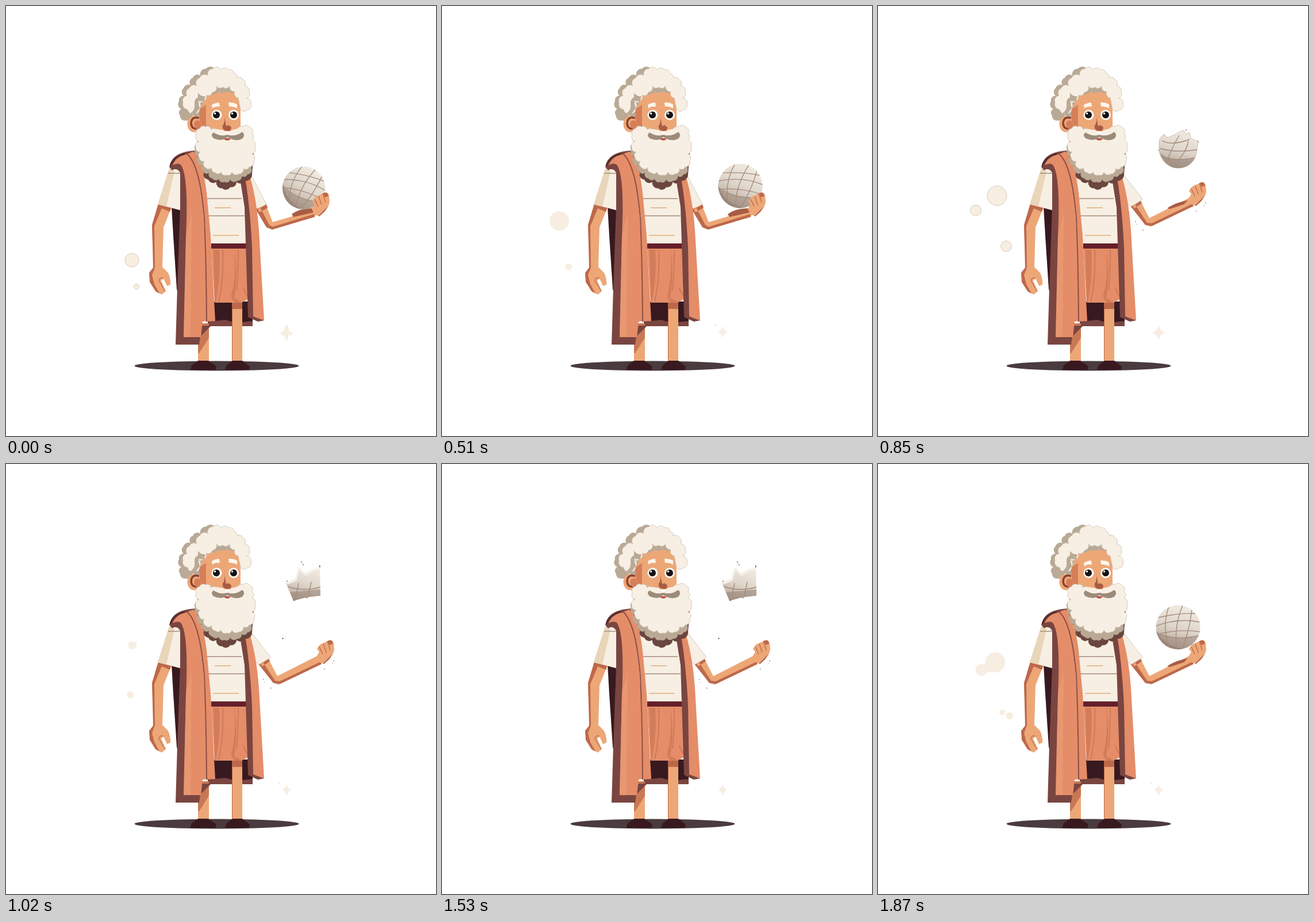
Write an HTML page that moves like this. It is 748x748 px and loops after 2040 ms.

```html
<!DOCTYPE html>
<html lang="en">
<head>
<meta charset="utf-8">
<title>Philosopher and orb</title>
<style>
html, body { margin: 0; width: 100%; height: 100%; overflow: hidden; background: #fff; }
svg { display: block; width: 100%; height: 100%; }
/* One group per 170 ms step; --k is its place in the loop. */
.step {
  visibility: hidden;
  animation: show 2040ms step-end infinite;
  animation-delay: calc(var(--k) * 170ms - 2040ms);
}
@keyframes show { 0% { visibility: visible } 8.33333%, 100% { visibility: hidden } }
.brows { animation: raise 2040ms step-end infinite; }
@keyframes raise { 0% { transform: none } 50% { transform: translateY(-3px) } 83.33333%, 100% { transform: none } }
.cream { fill: #f7efe3 }
.taupe { fill: #b9a995 }
.skin { fill: #eda777 }
.shade { fill: #bd684b }
.cloth { fill: #e48d68 }
.brown { fill: #7a4540 }
.dark { fill: #38191f }
.air { fill: #f7eee1 }
.line { fill: none; stroke: #a58b7c; stroke-width: 1.4 }
.rim { stroke: #c9bfb3; stroke-width: .8 }
</style>
</head>
<body>
<svg viewBox="0 0 748 748">
<defs>
  <linearGradient id="stone" x1=".65" y1="0" x2=".35" y2="1">
    <stop offset="0" stop-color="#f1ebe2"/>
    <stop offset=".5" stop-color="#dfd6cb"/>
    <stop offset="1" stop-color="#b3a396"/>
  </linearGradient>
  <clipPath id="round"><circle r="38.5"/></clipPath>

  <g id="ball">
    <circle r="38.5" fill="url(#stone)"/>
    <g clip-path="url(#round)">
      <path d="M-40 8Q-14 25 39 15V40H-40Z" fill="#8d796c" opacity=".42"/>
      <path d="M-39 4Q-22 34 8 36L0 42H-42Z" fill="#7f6a60" opacity=".35"/>
      <path class="line" d="M-34-17Q0-25 30-24M-39-2Q0-17 38-9M-38 13Q0 2 39 8M-38 9Q-5 25 38 14M-16-36Q-29 0-15 36M8-38Q-8 0-2 38M24-32Q20 6 7 38"/>
    </g>
  </g>

  <path id="sleeveA" class="cream rim" d="M414 284L423 288 453 345 437 355 416 335Z"/>
  <g id="forearmA">
    <path class="skin" d="M434 353L452 346 464 376 534 355 542 361 537 366 463 388 454 385Z"/>
    <path class="shade" d="M434 353L453 385 463 389 537 367 536 362 464 384 458 381 443 352ZM438 354L453 345 455 351 441 359Z"/>
    <path fill="#a95c44" d="M497 362Q512 351 537 352L540 358 500 367Z"/>
  </g>
  <g id="armB">
    <path class="cream rim" d="M414 284L423 288 449 351 436 357 416 335Z"/>
    <path class="skin" d="M433 356L447 351 458 380 530 369 539 376 534 383 459 398 450 396Z"/>
    <path class="shade" d="M433 356L449 396 458 399 535 384 534 380 459 394 454 392 440 354Z"/>
    <path fill="#a95c44" d="M497 375Q512 367 533 367L538 374 500 380Z"/>
  </g>
  <g id="armC">
    <path class="cream rim" d="M414 284L423 288 460 336 441 349 416 335Z"/>
    <path class="skin" d="M440 349L457 340 472 369 541 334 549 346 476 382 466 381Z"/>
    <path class="shade" d="M440 349L465 381 476 383 549 348 547 344 476 378 468 377 447 345ZM443 348L457 339 459 343 446 352Z"/>
  </g>
  <path id="cast" fill="#a95c44" d="M503 352Q514 343 539 338L532 345 508 353Z"/>
  <g id="hand">
    <path class="skin" d="M540 335L545 327 541 322Q545 313 553 311L562 307Q568 305 570 312L571 322Q570 333 561 337L551 347 544 344Z"/>
    <path class="shade" d="M558 309Q566 303 569 312L564 315ZM551 347L561 337 569 330 562 340 553 348Z"/>
    <path d="M545 318L551 331M552 313L557 328M560 311L564 324" fill="none" stroke="#bd684b" stroke-width="1.3"/>
  </g>

  <path id="spots" fill="#8b7468" d="M447 374h1.4v1.4h-1.4zM460 389h1.5v1.4h-1.5zM449 379h1v1h-1zM553 356h1.4v1.4h-1.4zM569 342h1.6v1.6h-1.6zM567 347h1v1h-1zM472 383h1v1h-1z"/>
  <path id="spot" fill="#8b7468" d="M480 303l2-1 1 2-2 1z"/>

  <g id="half">
    <path fill="url(#stone)" stroke="#b9aa9c" stroke-width=".7" d="M489 240L490 231 497 223 504 229 516 224 531 216 537 224 541 219 545 231 557 235 554 255C551 273 537 282 522 282 505 282 492 269 489 252Z"/>
    <path fill="#8d796c" opacity=".5" d="M490 255Q507 273 551 265 540 282 522 282 500 281 490 255Z"/>
    <path class="line" d="M491 248Q518 256 555 250M493 261Q516 271 551 264M504 267Q511 246 524 225M521 270Q536 254 540 235M494 234Q510 244 542 232"/>
    <path fill="#8b7468" d="M535 215h2v1.4h-2zM556 235h1.5v2h-1.5zM488 250h1v2h-1z"/>
  </g>
  <g id="cut">
    <path fill="url(#stone)" d="M487 207L503 200 509 179 521 190 536 182 541 186 546 178 547 229 522 232 500 238Z"/>
    <path fill="#8d796c" opacity=".48" d="M494 223L547 218V229L522 232 500 238Z"/>
    <path class="line" d="M490 213Q518 223 547 214M504 231L509 207M526 229L531 205"/>
    <path fill="none" stroke="#f7f2ea" stroke-width="3" d="M489 208L504 202 510 182 521 193 536 184 545 182"/>
    <path fill="#7d685d" d="M513 169l2 1-1 3zM516 174h1.5v2H516zM488 203h2v1.5h-2zM545 176h1.5v4H545zM499 237l4-1v2zM520 233l5-1v1.6z"/>
  </g>
  <g id="crown">
    <path fill="url(#stone)" stroke="#b3a394" stroke-width=".8" d="M485 178L503 173 507 150 521 161 535 156 539 146 549 187 529 200 512 208 498 204Z"/>
    <path fill="none" stroke="#f8f3eb" stroke-width="3" d="M488 180L505 176 509 154 521 164 536 159 539 151 546 186 511 205 499 202Z"/>
    <path class="line" d="M494 193Q518 196 545 178M505 200L507 181M528 194L533 170" opacity=".8"/>
    <g class="air rim"><circle cx="497" cy="140" r="5.5"/><circle cx="530" cy="142" r="4.5"/><circle cx="480" cy="170" r="3.5"/></g>
    <path fill="none" stroke="#bcae9f" d="M489 129l2 3M495 125v4M502 128l-2 3M487 137l3 1M525 128l1 4M531 126v4M537 131l-3 3M472 161l3 2M479 158v4M484 160l-2 3M469 168h3"/>
    <path fill="#8b7468" d="M508 215h2v1h-2zM514 217h1.4v1H514zM535 229h1.5v1H535z"/>
  </g>

  <path id="star" class="air" d="M0-1Q.14-.14 1 0Q.14.14 0 1Q-.14.14-1 0Q-.14-.14 0-1Z"/>
  <path id="plus" class="air" d="M485 556Q489 553 491 558L492 565 499 568 498 572 491 573 490 581 486 581 485 574 477 571 478 567 484 565Z"/>
  <circle id="dot" class="air" cx="475.5" cy="555.5" r="2"/>
  <g id="puffs0" class="air rim"><circle cx="219" cy="442" r="12"/><circle cx="227" cy="488" r="4.5"/></g>
  <g id="puffs1" class="air"><ellipse cx="217" cy="405" rx="17" ry="15.5"/><path d="M213 469L221 468 224 473 221 480 216 480 213 475Z"/></g>
  <g id="puffs2" class="air"><circle cx="204" cy="374" r="17"/><circle cx="220" cy="454" r="6"/></g>
  <g id="puffs3" class="air"><circle cx="204" cy="345" r="17.5"/><circle cx="180" cy="358" r="10.5"/><circle cx="192" cy="354" r="9"/><circle cx="216" cy="432" r="5"/><circle cx="229" cy="438" r="6.3"/></g>
  <g id="puffs4" class="air rim"><circle cx="207" cy="330" r="17"/><circle cx="170" cy="355.500" r="9.5"/><circle cx="223" cy="418" r="9.3"/></g>
  <g id="puffs5" class="air"><path d="M213 311L219 308 227 311 227 319 221 323 213 320Z"/><path d="M210 398L216 395 222 399 221 406 216 408 211 405Z"/></g>
  <g id="raised"><use href="#armC"/><use href="#hand"/><use href="#spots"/></g>
  <g id="tossed">
    <use href="#armC"/><use href="#cast"/><use href="#ball" x="522" y="284"/><use href="#hand"/>
    <use href="#puffs3"/><use href="#dot"/><use href="#star" transform="translate(488 567) scale(9 12)"/>
  </g>
  <g id="morph">
    <use href="#raised"/><use href="#cast"/><use href="#half"/><use href="#puffs4"/>
    <use href="#star" transform="translate(488 568) scale(12 15)"/>
  </g>
  <g id="final">
    <use href="#raised"/><use href="#spot"/><use href="#crown"/>
    <use href="#star" transform="translate(488 568) scale(8 9)"/>
  </g>
</defs>

<ellipse cx="366.500" cy="626" rx="143" ry="8.5" fill="#4a3b3e"/>

<g class="step" style="--k:0">
  <use href="#sleeveA"/><use href="#forearmA"/>
  <use href="#ball" transform="translate(518 316.500) rotate(20) scale(.965)"/><use href="#hand" x="-8" y="18"/>
  <use href="#puffs0"/><use href="#plus"/>
</g>
<g class="step" style="--k:1">
  <use href="#sleeveA"/><use href="#forearmA" x="-1" y="7"/>
  <use href="#ball" transform="translate(518 324) rotate(18) scale(.98)"/><use href="#hand" x="-8" y="26"/>
  <use href="#puffs0"/><use href="#plus"/>
</g>
<g class="step" style="--k:2">
  <use href="#armB"/>
  <use href="#ball" transform="translate(518.500 331) rotate(14) scale(1.02 .95)"/><use href="#hand" x="-8" y="34"/>
  <use href="#puffs1"/><use href="#dot"/><use href="#star" transform="translate(488 567) scale(9 12)"/>
</g>
<g class="step" style="--k:3">
  <use href="#sleeveA"/><use href="#forearmA"/>
  <use href="#ball" transform="translate(519 313) rotate(10)"/><use href="#hand" x="-8" y="18"/>
  <use href="#puffs2"/><use href="#dot"/><use href="#star" transform="translate(488 567) scale(9 12)"/>
</g>
<g class="step" style="--k:4"><use href="#tossed"/><use href="#spots"/></g>
<g class="step" style="--k:5"><use href="#morph"/></g>
<g class="step" style="--k:6">
  <use href="#raised"/><use href="#spot"/><use href="#cut"/><use href="#puffs5"/><use href="#dot"/>
  <use href="#star" transform="translate(488 567) scale(8 12)"/>
</g>
<g class="step" style="--k:7"><use href="#final"/></g>
<g class="step" style="--k:8"><use href="#final"/></g>
<g class="step" style="--k:9">
  <use href="#raised"/><use href="#spot"/><use href="#cut"/>
  <use href="#star" transform="translate(488 567) scale(8 12)"/>
</g>
<g class="step" style="--k:10"><use href="#morph"/></g>
<g class="step" style="--k:11"><use href="#tossed"/></g>

<!-- legs and shorts -->
<path class="dark" d="M346 514H429V557H352Z"/>
<path class="brown" d="M352 549L381 546 400 551 429 548V557H352Z"/>
<path class="skin" d="M334 552H353V618H334ZM393 510H411V618H393Z"/>
<path class="shade" d="M334 552H353V577L336 604H334Z" opacity=".75"/>
<path class="shade" d="M393 515H411V527H393Z"/>
<path d="M393.500 527V616M361 560" stroke="#bd684b" fill="none"/>
<path class="dark" d="M321 632L323 625 334 617H352L366 627 364 633H322ZM381 632L384 625 394 617H411L424 627 423 633H382Z"/>
<path class="cloth" d="M357 420H421L426 507 410 516H363Z"/>
<path d="M371 424Q374 470 365 515H363L361 424ZM398 423Q404 470 397 508L410 515 400 516Q388 510 394 495 400 465 398 423Z" fill="#d27c5b"/>
<path d="M377 424Q379 475 370 514M404 424Q404 470 401 495M413 490Q416 502 424 506" fill="none" stroke="#c46f51" stroke-width="1.2"/>

<!-- shirt -->
<path class="cream" d="M330 270H412L420 415H357Z"/>
<path fill="#651f2b" d="M357 413H420L421 422H357Z"/>
<path class="line" stroke-width="2" d="M347 335H410M352 365H415"/>
<path d="M363 351H391M360 399H405" fill="none" stroke="#e5be98" stroke-width="2"/>

<!-- hanging arm -->
<path class="dark" d="M288 349L304 352V520L297 492 291 400Z"/>
<path class="skin" d="M265 344L288 350 274 385 272 454 282 464Q287 475 286 485L280 487 274 474 270 478 278 496 271 502 261 497 251 481 249 465 257 455 254 381Z"/>
<path class="shade" d="M265 344L288 350 285 358 271 352 258 383 259 455 254 468 258 484 267 500 260 496 250 480 249 464 256 455 254 381Z"/>
<path d="M274 474Q268 470 266 478L277 496" fill="none" stroke="#bd684b" stroke-width="1.3"/>
<path class="cream" d="M289 276H306V356L264 345 282 288Z"/>
<path fill="#e9d5b9" d="M284 282L293 288 279 349 264 345Z"/>
<path class="line" d="M282 291H303"/>

<!-- collar shadow and robe -->
<path fill="#6b463e" d="M322 252L345 250 425 275 421 290 405 303 396 306 345 290 336 288Z"/>
<path class="brown" d="M407 300L418 286 428 340 432 541 421 541 415 350Z"/>
<path class="cloth" d="M414 288L421 287Q435 325 440 390L449 547 430 541 428 420Q424 340 414 288Z"/>
<path class="brown" d="M421 541L430 540 449 547 438 549Z"/>
<path class="brown" d="M284 280Q288 256 322 252L338 285 330 400 341 556H352L364 549 338 575 336 589H295L298 490 303 350V290Q297 280 289 286Z"/>
<path class="cloth" d="M290 277Q296 261 315 258 334 270 341 330L346 400 349 548 342 549 339 576H309L313 400Q318 295 304 276 298 272 290 277Z"/>
<path class="cloth" d="M316 257L326 253Q342 267 349 325L356 400 364 548 349 549 347 400Q344 290 316 257Z"/>
<path d="M316 258Q338 280 345 370 348 430 349 549" fill="none" stroke="#8d4f45" stroke-width="2"/>
<path fill="#eda078" opacity=".55" d="M313 400L323 360 321 576H309Z"/>
<path d="M286 278Q291 262 311 257" fill="none" stroke="#4b252a" stroke-width="2"/>

<!-- head -->
<path data-wave="330 250 431 255 428 292 415 304 401 306 390 315 376 317 366 306 352 302 344 290" fill="#6b463e"/>
<path data-wave="337 224 427 224 427 283 420 293 410 296 402 304 390 302 380 306 370 301 359 300 353 290 343 288 341 278 333 272 335 262 329 250 334 238" class="taupe"/>
<path data-wave="312 199 303 191 305 179 301 166 309 156 309 143 321 138 325 125 338 121 348 109 364 110 395 140 388 151 350 155 342 187 325 190" class="taupe"/>
<path class="skin" d="M347 156Q352 148 372 148L408 150V218H338L336 185Z"/>
<path fill="#d67e58" d="M336 180L348 172V214H337Z"/>
<path class="taupe" d="M356 154Q359 141 370 137L391 142 399 149Q391 154 386 148 378 154 371 149 363 155 356 154Z"/>
<ellipse class="skin" cx="327" cy="205.500" rx="11.500" ry="14"/>
<path d="M336 195Q323 191 322 204 323 215 333 213" fill="none" stroke="#8a4230" stroke-width="3.500"/>
<path fill="#d67e58" d="M327 204Q331 196 338 201V217Q328 216 327 204Z"/>
<path data-wave="316 180 308 168 315 156 319 143 332 139 337 125 351 121 360 109 374 111 387 111 397 118 402 125 412 128 415 139 423 149 418 160 426 171 419 181 408 180 404 160 398 149 389 139 377 141 366 139 359 150 348 155 344 165 334 166 337 178 328 187" class="cream rim"/>
<path class="taupe" d="M334 151Q339 158 347 157L344 166 334 165 337 178 329 188 320 187Q330 181 328 170 327 162 334 159Z"/>
<g class="brows" fill="#fdf6eb"><path d="M358 172Q364 168 371 168L372 175Q364 174 359 178Z"/><path d="M387 168Q395 167 402 171V178Q395 174 388 175Z"/></g>
<g fill="#fffaf1"><circle cx="366.500" cy="189.500" r="9"/><circle cx="396" cy="189.500" r="9"/></g>
<g fill="#151216"><circle cx="366" cy="189.500" r="6"/><circle cx="396" cy="189.500" r="6"/></g>
<g fill="#fff"><circle cx="363.500" cy="187" r="1.700"/><circle cx="393.500" cy="187" r="1.700"/></g>

<path data-wave="337 213 347 210 357 215 367 216 384 225 402 216 412 210 424 211 428 222 428 233 433 246 428 257 431 269 423 280 413 283 405 292 393 289 384 294 374 289 364 290 358 281 347 281 345 270 336 264 338 254 330 246 336 236 331 225" class="cream rim"/>
<path fill="#a95c44" d="M379 188Q382 202 377 208 375 215 383 217 392 219 392 211L387 207 383 209Z"/>
<path fill="#c04a3e" d="M378 231Q384 229 391 231 386 237 378 231Z"/>
<path fill="#9d8b7a" d="M385 224Q374 228 361 220 355 224 361 230 375 237 385 228 399 237 411 231 417 224 411 219 398 228 385 224Z"/>
<path class="cream" d="M384 222Q374 229 362 219L366 214 378 216ZM386 222Q397 229 410 219L404 213 392 216Z"/>
</svg>
<script>
// Closed scalloped outlines: one outward arc between neighbouring points.
for (const el of document.querySelectorAll('[data-wave]')) {
  const n = el.dataset.wave.split(' ').map(Number);
  const pts = n.flatMap((x, i) => i % 2 ? [] : [[x, n[i + 1]]]);
  let [px, py] = pts[0];
  let d = `M${px} ${py}`;
  for (const [x, y] of [...pts.slice(1), pts[0]]) {
    const len = Math.hypot(x - px, y - py);
    d += len < 19 ? `A${len * .62} ${len * .62} 0 0 1 ${x} ${y}` : `L${x} ${y}`;
    [px, py] = [x, y];
  }
  el.setAttribute('d', d + 'Z');
}
</script>
</body>
</html>
```
